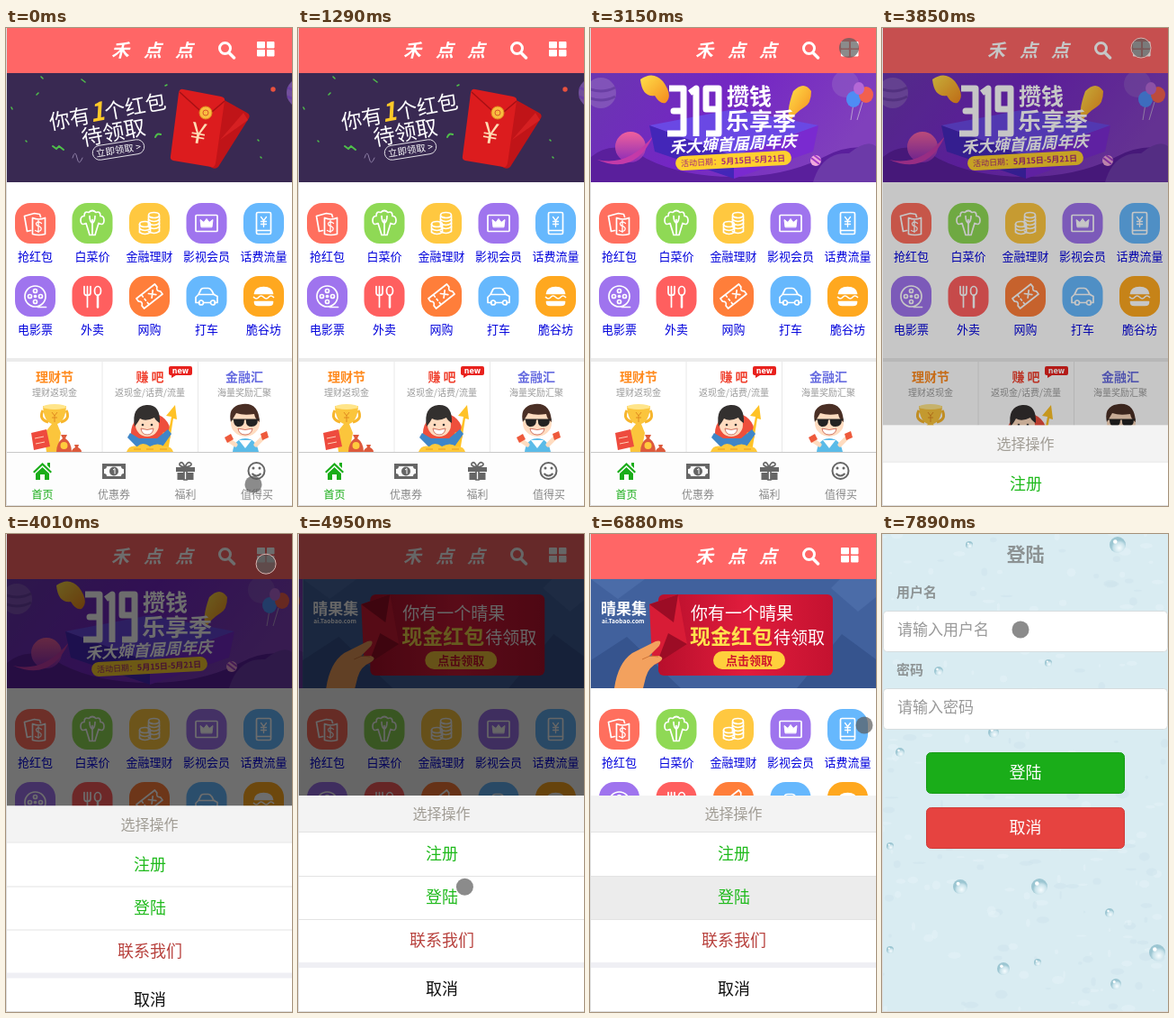
Write an HTML page that moves like this. It is 318 px wide and 530 px high and loops after 8 s.

```html
<!DOCTYPE html>
<html lang="zh-CN">
<head>
<meta charset="utf-8">
<style>
html, body { margin: 0; width: 100%; height: 100%; overflow: hidden; background: #fff; }
svg { display: block; }
text { font-family: "Noto Sans CJK SC", "Noto Sans CJK", "Noto Sans CJK JP", sans-serif; text-anchor: middle; }
.left { text-anchor: start; }
.bold { font-weight: 700; }
.line { fill: none; stroke: #fff; stroke-width: 1.7; stroke-linecap: round; stroke-linejoin: round; }
</style>
</head>
<body>
<svg width="318" height="530" viewBox="0 0 318 530">
<defs>
  <linearGradient id="violet" x2="1" y2=".3"><stop stop-color="#6a36b0"/><stop offset=".5" stop-color="#7426c4"/><stop offset="1" stop-color="#8040bc"/></linearGradient>
  <linearGradient id="gold" x2="1" y2="1"><stop stop-color="#ffe04a"/><stop offset="1" stop-color="#f58a1c"/></linearGradient>
  <linearGradient id="pink" x2="0" y2="1"><stop stop-color="#f0609c"/><stop offset="1" stop-color="#8a2cb8"/></linearGradient>
  <linearGradient id="red" x2="1"><stop stop-color="#b80f2c"/><stop offset=".5" stop-color="#e01c3c"/><stop offset="1" stop-color="#c41230"/></linearGradient>
  <radialGradient id="drop" cx=".6" cy=".7"><stop stop-color="#f6fcfe"/><stop offset=".7" stop-color="#c8e2ea"/><stop offset="1" stop-color="#9cc6d2"/></radialGradient>
</defs>

<g id="home">
  <rect width="318" height="530" fill="#fff"/>
  <rect width="318" height="50" fill="#f66"/>
  <g class="bold" fill="#fff" font-size="20" font-style="italic">
    <text x="127" y="32">禾</text><text x="163" y="32">点</text><text x="198" y="32">点</text>
  </g>
  <g class="line"><circle cx="243.500" cy="22.500" r="6" style="stroke-width:3"/><path d="M248.500 28l5 5" style="stroke-width:3.500"/></g>
  <path d="M279.500 15.500h8v6.500h-8zM290.500 15.500h7.500v6.500h-7.500zM279.500 24.500h8v6.500h-8zM290.500 24.500h7.500v6.500h-7.500z" fill="#fff" stroke="#fff" stroke-linejoin="round"/>

  <svg x="1" y="50" width="317" height="121" viewBox="1 50 317 121">
  <g id="slides">
    <g>
      <rect x="1" y="50" width="317" height="121" fill="#392952"/>
      <g fill="none" stroke="#4fc04a" stroke-width="2" stroke-linecap="round">
        <path d="M52 131l4 3 3-3 5 4M166 121q2-5 6-3M247 119q4-3 8 1"/>
        <path d="M84 57l4 3M34 74l2-2M39 54l2 2M22 125l1 1M6 88l1 2M177 64l2-1M280 124l1 1M283 143l1 1" stroke-width="1.500"/>
        <path d="M74 144q3-10 5 0t6 0" stroke="#8f80a8" stroke-width="1"/>
      </g>
      <circle cx="297" cy="68" r="2.700" fill="#e8513e"/>
      <g fill="#fff" font-size="23" font-weight="500" transform="rotate(-10.500 113 92)">
        <text x="70" y="101">你有</text><text class="bold" x="101" y="101" font-size="28" font-style="italic" fill="#ffc928">1</text><text x="144" y="101">个红包</text>
        <text x="115" y="125" font-size="24">待领取</text>
      </g>
      <g transform="rotate(-9 125 135)">
        <rect x="96" y="127" width="58" height="16" rx="8" fill="none" stroke="#fff" stroke-width=".8"/>
        <text x="125" y="139" font-size="10.500" fill="#fff">立即领取 &gt;</text>
      </g>
      <path d="M241 79l27 15q4 2 2 6l-34 54q-3 3-7 1l-20-11z" fill="#c01418"/>
      <path d="M264 94l-26 30 31-22z" fill="#d62022"/>
      <path d="M197 68l42 8q5 1 4 5l-10 69q-1 5-5 4l-42-7q-4-1-3-5l9-70q1-5 5-4z" fill="#dc1c1e"/>
      <path d="M193 71l30 27 20-17" fill="none" stroke="#a81014" stroke-width="1.500"/>
      <circle cx="222" cy="94" r="7" fill="#f9bd3f" stroke="#e08a20"/><circle cx="222" cy="94" r="3" fill="none" stroke="#d9572a"/>
      <text x="214" y="128" font-size="32" fill="#ffdcb4" transform="rotate(10 214 117)">¥</text>
    </g>

    <g transform="translate(317)">
      <rect x="1" y="50" width="317" height="121" fill="url(#violet)"/>
      <circle cx="12" cy="72" r="17" fill="#8a62bc" opacity=".7"/><path d="M-4 66q16 8 32 0M-4 76q16 8 32 0" fill="none" stroke="#6a3fa4" stroke-width="3"/>
      <circle cx="284" cy="62" r="15" fill="#8f5cc4" opacity=".6"/>
      <path d="M1 171v-28q26-22 62 2 40 20 97 20t100-22q30-16 58-8v36z" fill="#5a1f9c"/>
      <path d="M248 171q10-34 40-32 20-16 30-8v40z" fill="#6c3aa8"/>
      <circle cx="45" cy="132" r="17" fill="url(#pink)"/><path d="M8 146q34 8 62-26-20 44-62 26z" fill="#c43aa8"/>
      <path d="M66 108l94-18 94 18-94 34z" fill="#6a48e4"/>
      <path d="M66 108l94 34v25l-88-30z" fill="#4326b8"/><path d="M254 108l-94 34v25l88-30z" fill="#7a2ad0"/>
      <path d="M56 57q14-10 25 2 12 16 3 24-6 2-12-8-14 2-16-18z" fill="url(#gold)"/>
      <path d="M226 70q12-12 20 0 0 14-8 18-10 6-15 15-6-8 3-33z" fill="url(#gold)"/>
      <path d="M293 84l-3 18m13-20l-6 20" stroke="#ddd" stroke-width=".6"/>
      <ellipse cx="293" cy="79" rx="8" ry="9" fill="#4f8cf4"/><ellipse cx="307" cy="74" rx="8" ry="9" fill="#f2604e"/><ellipse cx="299" cy="67" rx="6" ry="7" fill="#b468d6"/>
      <circle cx="251" cy="147" r="6" fill="#f2a8dc"/><path d="M246 144l9 7M249 141l8 6" stroke="#a33cc8" stroke-width="2"/>
      <g fill="none" stroke="#fff" stroke-width="7" stroke-linejoin="round">
        <path d="M88 67h16v25H93h11v25H86M118 120V67l-7 5M143 90h-14V67h14v50h-14"/>
      </g>
      <g class="bold" fill="#fff" font-size="26">
        <text x="177" y="85" font-size="25">攒钱</text><text x="190" y="113">乐享季</text>
        <text x="159" y="135" font-size="17.700" font-style="italic" transform="rotate(-3 159 129)">禾大婶首届周年庆</text>
      </g>
      <g transform="rotate(-3 159 147)">
        <rect x="95" y="139" width="129" height="16" rx="8" fill="#ffd02e"/>
        <text x="159" y="150.500" font-size="9" fill="#a52a78">活动日期：<tspan class="bold">5月15日-5月21日</tspan></text>
      </g>
    </g>

    <g transform="translate(634)">
      <rect x="1" y="50" width="317" height="121" fill="#41619d"/>
      <path d="M1 140l40-26 60 57H1zM230 171l50-60 38 28v32z" fill="#36548e"/>
      <path d="M268 60l30 26 20-16V50h-40zM1 50h60l-30 22z" fill="#4b6ca8"/>
      <g fill="#fff" class="bold"><text class="left" x="12" y="89" font-size="17">晴果集</text><text class="left" x="13" y="99" font-size="6.700">ai.Taobao.com</text></g>
      <rect x="76" y="67" width="194" height="90" rx="6" fill="url(#red)"/>
      <path d="M66 78l32-11 10 55-34 22q-4 1-5-3z" fill="#d81c36"/>
      <path d="M66 78l27 20 5-31zM74 144l13-34 21 12z" fill="#9c0c25"/>
      <path d="M27 171q4-28 20-39l26-13q8-2 4 5l-12 12 11-1q8 2 1 7-12 5-15 17l-3 12z" fill="#f3a15e"/>
      <path d="M58 139l9-4 9 1" fill="none" stroke="#cf7437"/>
      <text class="left" x="112" y="95" font-size="19" fill="#fff">你有一个晴果</text>
      <text class="left bold" x="111" y="122" font-size="23" fill="#ffe14d">现金红包</text>
      <text class="left" x="204" y="121.500" font-size="19" fill="#fff">待领取</text>
      <rect x="137" y="130" width="80" height="20" rx="10" fill="#ffcf3c"/>
      <text class="bold" x="177" y="145" font-size="13" fill="#d0142c">点击领取</text>
    </g>
  </g>
  </svg>

  <g id="grid"></g>

  <rect y="366" width="318" height="4" fill="#ebebeb"/>
  <path d="M107 370v100M213.500 370v100" stroke="#e8e8e8"/>
  <g class="bold" font-size="14">
    <text x="54" y="392" fill="#ff8a1e">理财节</text><text x="160" y="392" fill="#f0402e">赚 吧</text><text x="265" y="392" fill="#666be0">金融汇</text>
  </g>
  <g font-size="10" fill="#999">
    <text x="54" y="408">理财返现金</text><text x="160" y="408">返现金/话费/流量</text><text x="265" y="408">海量奖励汇聚</text>
  </g>
  <path d="M183 375h22q2 0 2 2v6q0 2-2 2h-16l-5 3v-3q-3 0-3-2v-6q0-2 2-2z" fill="#e8211d"/>
  <text class="bold" x="194" y="382.500" font-size="8" style="font-family:'DejaVu Sans',sans-serif" fill="#fff">new</text>

  <g>
    <path d="M41 424q-5 10 6 13M67 424q5 10-6 13" fill="none" stroke="#f7b52c" stroke-width="3"/>
    <path d="M41 419h26q-1 17-10 20l4 10-4 21H45l-3-20 9-11q-9-3-10-20z" fill="#fbc53c"/><ellipse cx="54" cy="420" rx="13" ry="3" fill="#ffe58a"/>
    <path d="M51 426l3 4 3-4M54 430v7M51 432h6" fill="none" stroke="#e08a20"/>
    <path d="M28 449l17-4 4 19-18 4z" fill="#ee4b3e"/><path d="M32 455l10-2M33 461l10-2" stroke="#ffd0b8"/>
    <path d="M61 451h7l-2 4q7 5 7 15H56q0-10 7-15z" fill="#dd5a3c"/><circle cx="64.500" cy="463" r="4" fill="#ffcb3d"/>
    <path d="M76 462h5l-1 3q4 2 4 5H73q0-3 4-5z" fill="#dd5a3c"/>
  </g>
  <g>
    <circle cx="161" cy="449" r="22" fill="#ee4f3c"/>
    <path d="M165 470l10-22 5 3 4-20-6-1 10-12 2 16-4-1-6 37z" fill="#ffc226"/>
    <path d="M138 449l10 6h20l12-10 4 5-12 17h-24l-13-13z" fill="#3f86c8"/>
    <circle cx="157" cy="440" r="13" fill="#ffdcc0"/>
    <path d="M143 442q-4-22 13-24 16-1 15 20-5-3-6-6-10 5-16 1-2 4-6 9z" fill="#33302f"/>
    <path d="M150 444q7 3 14 0-1 7-7 7t-7-7z" fill="#fff" stroke="#c65a48" stroke-width=".8"/><circle cx="152" cy="440" r="1.300" fill="#333"/><circle cx="162" cy="440" r="1.300" fill="#333"/>
    <path d="M134 470q3-8 12-6 6-6 14 0 9-5 16 0 8-1 10 6z" fill="#ffc93a"/><path d="M142 467h8M156 467h8M171 467h8" stroke="#e79a1e"/>
  </g>
  <g>
    <path d="M252 470q2-15 14-15t15 15z" fill="#5bbbe8"/><path d="M259 457h14l-7 9z" fill="#fff"/>
    <ellipse cx="266" cy="438" rx="16" ry="15" fill="#ffdcc0"/>
    <path d="M250 437q-4-18 13-20 18-2 19 20-5-3-6-9-12 2-20-1-3 5-6 10z" fill="#4a2f25"/>
    <path d="M253 434h12q0 8-6 8t-6-8zM267 434h13q0 8-7 8t-6-8z" fill="#222"/><path d="M250 434h32" stroke="#222"/>
    <path d="M258 444q8 3 16 0-1 7-8 7t-8-7z" fill="#fff" stroke="#c65a48" stroke-width=".8"/>
    <path d="M255 462l-6-4M278 462l7-7" stroke="#ffdcc0" stroke-width="5" stroke-linecap="round"/>
    <path d="M243 454l7-4 3 6-7 4zM283 450l7-3 2 7-7 3z" fill="#ee5a3c"/>
  </g>

  <rect y="470" width="318" height="60" fill="#fdfdfd"/><path d="M0 470.500h318" stroke="#c8c8c8"/>
  <g fill="#666">
    <path d="M30 492l10.500-10 10.500 10-1.500 1.500L40.500 485l-9 8.500zM46 482h3v6l-3-3zM33 494l7.500-7 7.500 7v7h-5v-6h-5v6h-5z" fill="#1aad19"/>
    <path d="M107 483h26v17h-26z"/><path d="M112 486h16q0 3 3 3v5q-3 0-3 3h-16q0-3-3-3v-5q3 0 3-3z" fill="#fdfdfd"/><circle cx="120" cy="491.500" r="5"/><path d="M119 490l2-1.500v6" stroke="#fff" fill="none"/>
    <path d="M189 487h21v5h-21zM190.500 493h7.500v8h-7.500zM201 493h7.500v8H201z"/><path d="M199 487q-7-1-6-4 3-4 6 4 3-8 7-4 1 3-7 4zM198 487h3v14h-3z" fill="none" stroke="#666" stroke-width="1.700"/>
    <g fill="none" stroke="#666" stroke-width="2"><circle cx="278.500" cy="491" r="9"/><path d="M273.500 494q5 5 10 0"/></g><circle cx="275" cy="488" r="1.500"/><circle cx="282" cy="488" r="1.500"/>
  </g>
  <g font-size="12" fill="#888">
    <text x="40.500" y="522" fill="#1aad19">首页</text><text x="120" y="522">优惠券</text><text x="199.500" y="522">福利</text><text x="279" y="522">值得买</text>
  </g>
</g>

<rect id="mask" width="318" height="530"/>

<g id="sheet">
  <rect y="290" width="318" height="240" fill="#fff"/>
  <rect y="290" width="318" height="40" fill="#f3f3f3"/>
  <rect id="active" y="379" width="318" height="49" fill="#ececec"/>
  <path d="M0 330.500h318M0 379.500h318M0 427.500h318" stroke="#e3e3e3"/>
  <rect y="475" width="318" height="6" fill="#efeff4"/>
  <text x="159.500" y="316" font-size="16" fill="#a09c94">选择操作</text>
  <g font-size="18" font-weight="500" fill="#1fba1c">
    <text x="160" y="361">注册</text><text x="160" y="409">登陆</text><text x="160" y="457" fill="#b8423e" font-weight="400">联系我们</text><text x="160" y="511" fill="#111" font-weight="400">取消</text>
  </g>
</g>

<g id="login">
  <rect width="318" height="530" fill="#fff"/>
  <g id="water"><rect width="318" height="530" fill="#d9ecf2"/></g>
  <g class="bold" fill="#8d9394">
    <text x="159.500" y="30" font-size="21">登陆</text><text class="left" x="16" y="70" font-size="15">用户名</text><text class="left" x="16" y="156" font-size="15">密码</text>
  </g>
  <g fill="#fff" stroke="#d5dcde"><rect x="1.500" y="85.500" width="316" height="45" rx="4"/><rect x="1.500" y="171.500" width="316" height="45" rx="4"/></g>
  <g font-size="17" fill="#999"><text class="left" x="17" y="112">请输入用户名</text><text class="left" x="17" y="198">请输入密码</text></g>
  <rect x="49.500" y="242.500" width="220" height="45" rx="5" fill="#1aad19" stroke="#179b16"/>
  <rect x="49.500" y="303.500" width="220" height="45" rx="5" fill="#e64340" stroke="#cf3c39"/>
  <g font-size="18" fill="#fff"><text x="159.500" y="271">登陆</text><text x="159.500" y="332">取消</text></g>
</g>

<path d="M.5 0v529.500H318" fill="none" stroke="#ddd"/>
<circle id="pointer" fill="#5a5a5a" fill-opacity=".7"/>
</svg>

<script>
const $ = id => document.getElementById(id);

// Shortcuts: label, tile colour, icon drawn around the tile centre
const tiles = [
  ['抢红包', '#ff6f5e', '<path d="M-3-6q7 3 14 0v18q-7 2-14 0zM-5 8l-4 1-3-17 11-3 6 1 1 3"/><path d="M7 0q-4-3-6 0 0 3 3 3 4 2 2 5-3 2-6 0M3.500-3v13" stroke-width="1.300"/>'],
  ['白菜价', '#8fd955', '<path d="M-3 13q-3-10-4-13-6 3-6-3 0-5 4-5 0-6 5-4 4-4 8 0 5-2 5 4 4 0 4 5 0 6-6 3-1 3-4 13zM0 12V-4M-3-8q0 6 3 8 3-2 3-8"/>'],
  ['金融理财', '#ffc840', [-8, -4, 0].map(y => `<path d="M-1 ${y}v4q6 4 12 0v-4"/>`).join('') + '<ellipse cx="5" cy="-9" rx="6" ry="3"/><path d="M11 4v5q-6 4-12 0"/><ellipse cx="-5" cy="1" rx="6" ry="3"/><path d="M-11 1v9q6 4 12 0V1M-11 6q6 4 12 0"/>'],
  ['影视会员', '#9f74ee', '<rect x="-12" y="-9" width="24" height="18" rx="1"/><path d="M-6 4l-1-8 4 3 3-4 3 4 4-3-1 8z" fill="#fff" stroke-width="1"/>'],
  ['话费流量', '#66b8fd', '<rect x="-8" y="-12" width="16" height="24" rx="1.500"/><path d="M-8 8H8M-3-7l3 4 3-4M0-3v7M-3-2h6M-3 1h6" stroke-width="1.300"/>'],
  ['电影票', '#9f74ee', '<circle r="11.500"/><circle r="1"/>' + [[0, -6], [6, 0], [0, 6], [-6, 0]].map(([x, y]) => `<circle cx="${x}" cy="${y}" r="2"/>`).join('') + '<path d="M3 12h9"/>'],
  ['外卖', '#ff5f5f', '<path d="M-9-11v7q0 3 3.500 3t3.500-3v-7M-5.500-11v23"/><ellipse cx="6" cy="-6" rx="3.500" ry="5"/><path d="M6-1v13" stroke-width="2.500"/>'],
  ['网购', '#ff7e3a', '<g transform="rotate(-38)"><path d="M-13-7h26v4q-4 3 0 6v4h-26V3q4-3 0-6z"/><path d="M-6-6V6" stroke-dasharray="2 3"/><path d="M1-3l6 6M7-3L1 3"/></g>'],
  ['打车', '#66b8fd', '<path d="M-8 7h-4v-6l3-3 3-6q1-1 3-1h5q2 0 4 3l2 4 4 2v7H9M-3 7h7M-8-2H9"/><circle cx="-6" cy="7" r="2.500"/><circle cx="7" cy="7" r="2.500"/>'],
  ['脆谷坊', '#ffa81f', '<path d="M-10-3q1-7 10-7T10-3zM-10 6h20q0 4-4 4H-6q-4 0-4-4z" fill="#fff"/><path d="M-11 1q3 3 5.500 0t5.500 0 5.500 0 5.500 0"/>']
];
$('grid').innerHTML = tiles.map(([label, colour, icon], i) => {
  const x = 32.5 + i % 5 * 63.5, y = i < 5 ? 216.5 : 297.5;
  return `<g transform="translate(${x} ${y})"><rect x="-22.500" y="-22.500" width="45" height="45" rx="17" fill="${colour}"/>
    <g class="line">${icon}</g><text y="41.500" font-size="13" fill="#0000dc">${label}</text></g>`;
}).join('');

// Wet glass: soft random flecks, then the larger drops
let seed = 7;
const random = () => (seed = seed * 16807 % 2147483647) / 2147483647;
let water = '';
for (let i = 0; i < 260; i++) {
  water += `<ellipse cx="${random() * 318}" cy="${random() * 530}" rx="${1 + random() * 7}" ry="${1 + random() * 4}"
    fill="${random() < .6 ? '#e6f4f8' : '#cbe3ea'}" opacity=".45"/>`;
}
const drops = [[262, 12, 9], [97, 12, 4], [63, 152, 5], [124, 220, 6], [20, 242, 5], [87, 391, 8], [175, 391, 9], [253, 420, 5],
  [306, 464, 9], [135, 482, 7], [260, 499, 6], [9, 461, 4], [9, 346, 4], [212, 180, 4], [185, 143, 4], [173, 475, 4]];
for (const [x, y, r] of drops) {
  water += `<circle cx="${x}" cy="${y}" r="${r}" fill="url(#drop)"/><circle cx="${x - r * .3}" cy="${y - r * .4}" r="${r * .25}" fill="#fff"/>`;
}
$('water').innerHTML += water;

// Pointer stops: time, x, y
const path = [[0, 275, 506], [60, 275, 506], [660, 275, 20], [800, 275, 20], [980, 289, 24], [1180, 289, 24], [1210, 296, 24], [1290, 296, 24],
  [2830, 309, 27], [3150, 288, 22], [3850, 288, 22], [4010, 289, 33], [4090, 296, 50], [4630, 200, 372], [5180, 175, 405],
  [5640, 175, 405], [5880, 228, 335], [6420, 297, 244], [6880, 305, 212], [7400, 305, 212], [7890, 154, 106], [8000, 154, 106]];

const ease = (t, from, to) => 1 - (1 - Math.min(1, Math.max(0, (t - from) / (to - from)))) ** 2.5;
const show = (id, on) => $(id).style.display = on ? '' : 'none';
const move = (id, x, y) => $(id).setAttribute('transform', `translate(${x} ${y})`);

function draw(t) {
  move('slides', -317 * (ease(t, 1560, 1900) + ease(t, 4680, 5010)), 0);
  const open = ease(t, 3800, 4100);
  move('sheet', 0, 240 * (1 - open));
  $('mask').setAttribute('opacity', .6 * open * (1 - ease(t, 5960, 6300)));
  show('sheet', t > 3800);
  show('active', t >= 5960);
  show('login', t >= 7030);
  show('water', t >= 7200);

  const next = path.findIndex(stop => stop[0] > t);
  const [t0, x0, y0] = path[next - 1], [t1, x1, y1] = path[next], k = (t - t0) / (t1 - t0);
  const pressed = t >= 3150 && t < 4090;
  move('pointer', x0 + (x1 - x0) * k, y0 + (y1 - y0) * k);
  $('pointer').setAttribute('r', pressed ? 11 : 9.5);
  $('pointer').setAttribute('stroke', pressed && t > 3850 ? '#d8b4b0' : 'none');
  show('pointer', t < 1290 || t >= 2830);
}

function tick() {
  draw(performance.now() % 8000);
  requestAnimationFrame(tick);
}
tick();
</script>
</body>
</html>
```
